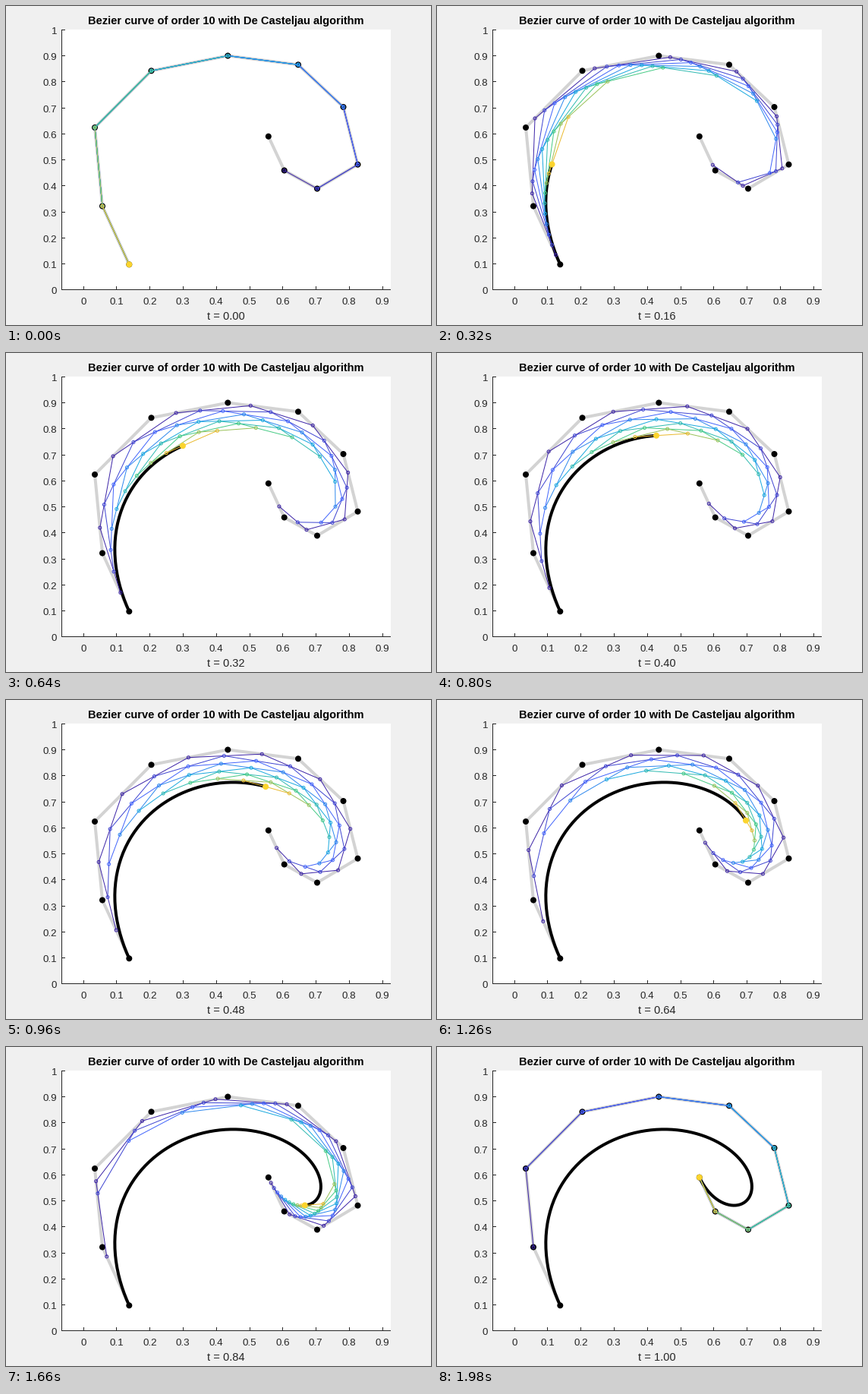
Animation, 560 px wide and 420 px high, one loop 2000 ms. Source, as a matplotlib script:

```python
import numpy as np
import matplotlib.pyplot as plt
from matplotlib.animation import FuncAnimation
from matplotlib.colors import LinearSegmentedColormap

W, H, DPI = 560, 420, 80
FRAMES, LOOP_MS = 100, 2000
LEFT, RIGHT, TOP, BOTTOM = 73, 507, 31, 373.8
INK = (0.15, 0.15, 0.15)

# Hand-placed control points in stage pixels
CONTROL = np.array([
    (162.3, 340.3), (127, 263.5), (117, 160), (191.5, 85.3), (292.3, 65.5),
    (385, 77.3), (444.5, 133), (463.5, 208.7), (410, 240.5), (366.7, 216.5),
    (345.8, 171.7)])
ORDER = len(CONTROL) - 1

# Dark blue to gold, one colour per reduction level
STOPS = ["#3e26a8", "#4367fd", "#1caadf", "#48cb86", "#eaba30", "#fbd42e"]
CMAP = LinearSegmentedColormap.from_list(
    "levels", list(zip(np.array([0, 2, 4, 6, 8, 9]) / 9, STOPS)))
COLORS = CMAP(np.linspace(0, 1, ORDER))

plt.rcParams["font.family"] = "Liberation Sans"


def px(n):
    """Pixels to points."""
    return n * 72 / DPI


def casteljau(t):
    """All reduction levels at t, from ORDER points down to one."""
    levels, pts = [], CONTROL
    while len(pts) > 1:
        pts = (1 - t) * pts[:-1] + t * pts[1:]
        levels.append(pts)
    return levels


fig = plt.figure(figsize=(W / DPI, H / DPI), dpi=DPI, facecolor="#f0f0f0")
ax = fig.add_axes([0, 0, 1, 1])
ax.set(xlim=(0, W), ylim=(H, 0))
ax.axis("off")


def label(x, y, s, size, **kw):
    return ax.text(x, y, s, fontsize=px(size), va="baseline",
                   **{"color": INK, "ha": "center", **kw})


def rule(*ends):
    """Crisp one-pixel line through pixel centres."""
    ax.plot(*(np.floor(ends).T + 0.5), color=INK, lw=px(1), snap=False,
            solid_capstyle="projecting", zorder=1)


def dot(center, color, zorder):
    return ax.add_patch(plt.Circle(center, 4, fc=color, ec="none", zorder=zorder))


def draw_axes():
    ax.add_patch(plt.Rectangle((LEFT, TOP), RIGHT - LEFT, BOTTOM - TOP,
                               fc="white", ec="none", zorder=0))
    rule((LEFT, BOTTOM), (RIGHT - 1, BOTTOM))
    rule((LEFT, TOP), (LEFT, BOTTOM))
    for k in range(11):
        name = f"{k / 10:g}"
        y = BOTTOM - 34.23 * k
        rule((LEFT, y), (LEFT + 4, y))
        label(67.3, y + 5.5, name, 13.33, ha="right")
        if k < 10:
            x = 102.2 + 43.78 * k
            rule((x, BOTTOM), (x, BOTTOM - 4))
            label(x - 0.5, 393, name, 13.33)


draw_axes()
label(289.8, 24, "Bezier curve of order 10 with De Casteljau algorithm", 14.67,
      weight="bold", color="black")
time_label = label(289.5, 413, "", 14.67)

ax.plot(*CONTROL.T, color="#d3d3d3", lw=px(4), solid_joinstyle="round", zorder=2)
for p in CONTROL:
    dot(p, "black", 3)
trace, = ax.plot([], [], color="black", lw=px(4), zorder=4)
lines = [ax.plot([], [], color=c, lw=px(1), zorder=5)[0] for c in COLORS[:-1]]
rings = ax.scatter(*np.vstack(casteljau(0)[:-1]).T, s=px(4) ** 2,
                   facecolors="none", linewidths=px(1), zorder=6,
                   edgecolors=np.repeat(COLORS[:-1], range(ORDER, 1, -1), axis=0))
tip = dot(CONTROL[0], COLORS[-1], 7)

TIMES = np.linspace(0, 1, FRAMES)
CURVE = np.array([casteljau(t)[-1][0] for t in TIMES])


def update(i):
    *levels, _ = casteljau(TIMES[i])
    for line, pts in zip(lines, levels):
        line.set_data(*pts.T)
    rings.set_offsets(np.vstack(levels))
    trace.set_data(*CURVE[:i + 1].T)
    tip.center = CURVE[i]
    time_label.set_text(f"t = {TIMES[i]:.2f}")
    return [trace, *lines, rings, tip, time_label]


anim = FuncAnimation(fig, update, frames=FRAMES, interval=LOOP_MS / FRAMES,
                     repeat=True, repeat_delay=0)
plt.show()
```
